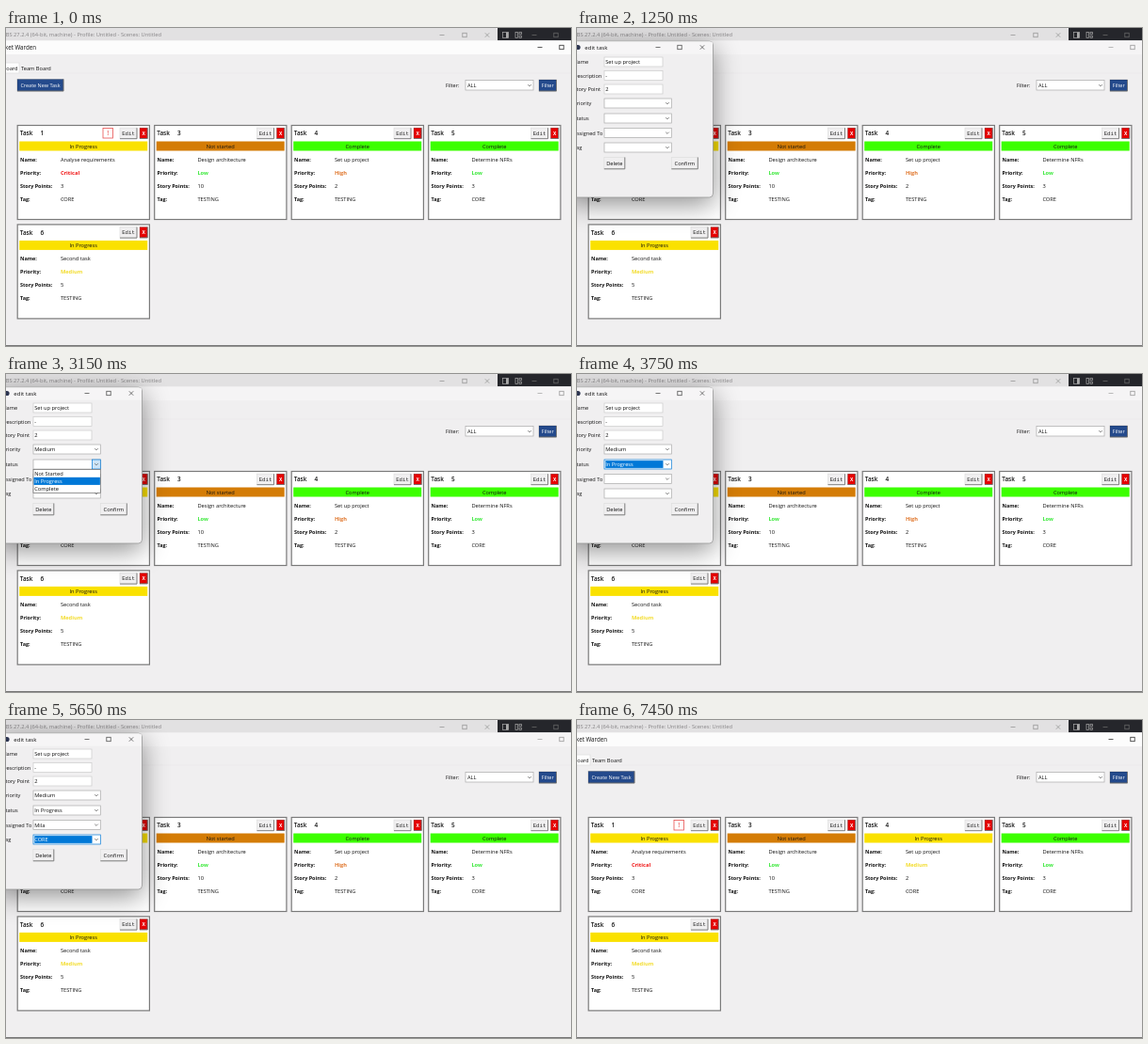
These frames come from a looping animation (600 px wide and 338 px high, 7.5 s). An HTML page with a canvas:

```html
<!DOCTYPE html>
<html lang="en">
<head>
<meta charset="utf-8">
<title>Task board</title>
<style>
html, body { margin: 0; height: 100%; overflow: hidden; background: #f0eff0; }
canvas { display: block; width: 600px; height: 338px; }
</style>
</head>
<body>
<canvas id="stage" width="600" height="338"></canvas>
<script>
const ctx = document.getElementById('stage').getContext('2d');
const LOOP = 7500, OPEN = 500, CLOSE = 6800;
const SANS = '"Open Sans", "Noto Sans", sans-serif';
const MONO = '"Liberation Mono", monospace';
const FACE = '#f0eff0', BLUE = '#0078d7', NAVY = '#244a8c';
const STATUS = { 'In Progress': '#fae100', 'Not started': '#d47c06', 'Complete': '#3cff00' };
const PRIORITY = { Critical: '#f01414', High: '#e0752a', Medium: '#f3dc2c', Low: '#35e835' };

// Each drop-down: centre line, choices, chosen index, opening and choosing time
const combos = [
  { label: 'Priority', y: 80, items: ['Low', 'Medium', 'High', 'Critical'], pick: 1, open: 1700, done: 2250 },
  { label: 'Status', y: 96, items: ['Not Started', 'In Progress', 'Complete'], pick: 1, open: 2700, done: 3300 },
  { label: 'Assigned To', y: 111.5, items: ['Person', 'Mila'], pick: 1, open: 4050, done: 4500 },
  { label: 'Tag', y: 127, items: ['CORE', 'TESTING'], pick: 0, open: 4900, done: 5400 }
];

function box(x, y, w, h, fill, stroke, line = 0.7) {
  if (fill) { ctx.fillStyle = fill; ctx.fillRect(x, y, w, h); }
  if (stroke) { ctx.strokeStyle = stroke; ctx.lineWidth = line; ctx.strokeRect(x, y, w, h); }
}

// y is the middle of the capitals
function text(s, x, y, { size = 5.7, color = '#111', weight = 400, align = 'left', font = SANS } = {}) {
  ctx.font = `${weight} ${size}px ${font}`;
  ctx.textAlign = align;
  ctx.fillStyle = color;
  ctx.fillText(s, x, y + size * 0.36);
}

function path(color, width, ...points) {
  ctx.strokeStyle = color;
  ctx.lineWidth = width;
  ctx.beginPath();
  points.forEach(([x, y]) => ctx.lineTo(x, y));
  ctx.stroke();
}

const dash = (x, y, c) => path(c, 0.8, [x - 2.5, y], [x + 2.5, y]);
const square = (x, y, c) => box(x - 2.2, y - 2.2, 4.4, 4.4, null, c, 0.8);
const chevron = (x, y) => path('#555', 0.7, [x - 1.8, y - 0.9], [x, y + 0.9], [x + 1.8, y - 0.9]);
function cross(x, y, c) {
  path(c, 0.8, [x - 2.2, y - 2.2], [x + 2.2, y + 2.2]);
  path(c, 0.8, [x - 2.2, y + 2.2], [x + 2.2, y - 2.2]);
}

function button(label, x, y, w, h, fill = FACE, color = '#111', style = {}) {
  box(x, y, w, h, fill, fill === FACE ? '#dedede' : 'rgba(0,0,0,0.3)');
  path('#757575', 0.9, [x, y + h], [x + w, y + h], [x + w, y]);
  text(label, x + w / 2, y + h / 2, { color, align: 'center', ...style });
}

function topBars(focused) {
  box(522, 0, 78, 13.3, '#25262b');
  box(527.5, 4.5, 6, 6, null, '#aaa');
  box(531, 4.5, 2.5, 6, '#aaa');
  box(541, 4.5, 2.5, 6, null, '#aaa');
  box(545, 4.5, 2.5, 2.2, null, '#aaa');
  box(545, 8.3, 2.5, 2.2, null, '#aaa');
  dash(561, 7.5, '#666');
  square(584, 7.5, '#666');

  ctx.fillStyle = '#e2e1e2';
  ctx.beginPath();
  ctx.roundRect(-5, 0, 527, 14, [0, 3, 0, 0]);
  ctx.fill();
  text('OBS 27.2.4 (64-bit, machine) - Profile: Untitled - Scenes: Untitled', 165, 7,
    { size: 5.75, color: '#858385', align: 'right' });
  dash(463, 7.5, '#999');
  square(487, 7.5, '#999');
  cross(511, 7.5, '#999');

  box(0, 13.3, 600, 14.7, focused ? '#fcfcfc' : '#f5f4f5');
  text('Ticket Warden', 32, 20.5, { size: 6.2, align: 'right' });
  dash(567, 20.5, focused ? '#333' : '#aaa');
  square(590, 20.5, focused ? '#333' : '#999');
}

function toolbar() {
  box(-1, 37, 15, 11, '#fff', '#ddd');
  text('Board', 12.5, 43, { align: 'right' });
  text('Team Board', 16, 43);
  path('#e6e5e6', 0.6, [14, 48], [600, 48]);
  button('Create New Task', 12, 54.5, 49, 12.5, NAVY, '#fff', { size: 5.5 });
  text('Filter:', 467, 61, { size: 5.5 });
  box(488, 55.5, 72, 10.5, '#fff', '#aaa');
  text('ALL', 490, 61);
  chevron(556, 61);
  button('Filter', 566, 55, 18.5, 12, NAVY, '#fff', { size: 5.5 });
}

function card(col, row, id, status, name, priority, points, tag) {
  const x = 12.2 + col * 145.5, y = 103.5 + row * 105.4;
  box(x, y, 140.2, 100, '#fff', '#7a7a7a', 1.2);
  text('Task', x + 2.6, y + 8.5, { size: 6.4, weight: 600 });
  text(id, x + 24.3, y + 8.5, { size: 6.4, weight: 600 });
  if (id === 1) {
    box(x + 90.8, y + 3, 10.5, 10.5, '#fff', '#e85050', 0.8);
    text('!', x + 96, y + 8.2, { size: 7, color: '#e02020', align: 'center' });
  }
  button('Edit', x + 108.8, y + 2.7, 18, 11.5, FACE, '#222', { size: 5.7, font: MONO });
  button('X', x + 129.8, y + 2.7, 8.2, 11.3, '#e60000', '#fff', { size: 5.6, weight: 700, font: MONO });
  box(x + 2, y + 17, 136, 10, STATUS[status]);
  text(status, x + 70, y + 22, { align: 'center' });
  const rows = [['Name:', name], ['Priority:', priority], ['Story Points:', points], ['Tag:', tag]];
  rows.forEach(([label, value], i) => {
    const ry = y + 36.3 + i * 14;
    text(label, x + 2.8, ry, { size: 5.45, weight: 700 });
    text(value, x + 45.7, ry, i === 1 ? { weight: 700, color: PRIORITY[value] } : {});
  });
}

function combo({ label, y, items, pick, open, done }, t, next) {
  const isOpen = t >= open && t < done, focused = t >= done && t < next;
  text(label, -3.6, y, { size: 5.6 });
  box(29, y - 5, 71.3, 10, '#fff', focused ? BLUE : '#aaa');
  if (isOpen) box(91.5, y - 5, 8.8, 10, '#cce4f7', BLUE);
  if (focused) box(30.3, y - 3.9, 61.2, 7.8, BLUE);
  if (t >= done) text(items[pick], 30.2, y, { color: focused ? '#fff' : '#111' });
  chevron(96, y);
}

function dropList({ y, items, pick, open, done }, t) {
  if (t < open || t >= done) return;
  const top = y + 5.4, pitch = 8.1;
  const progress = (t - open) / (done - open);
  const hover = Math.min(pick, Math.floor(progress * 2 * (pick + 1)) - 1);
  box(29, top, 71.3, items.length * pitch + 0.6, '#fff', '#666');
  items.forEach((item, i) => {
    const iy = top + 0.3 + i * pitch;
    if (i === hover) box(29.5, iy, 70.4, pitch, BLUE);
    text(item, 30.2, iy + pitch / 2, { color: i === hover ? '#fff' : '#111' });
  });
}

function dialog(t) {
  ctx.save();
  ctx.shadowColor = 'rgba(0,0,0,0.45)';
  ctx.shadowBlur = 28;
  ctx.shadowOffsetY = 7;
  ctx.fillStyle = FACE;
  ctx.beginPath();
  ctx.roundRect(-12, 14, 156.5, 166, 4);
  ctx.fill();
  ctx.restore();
  ctx.strokeStyle = '#999';
  ctx.lineWidth = 0.8;
  ctx.stroke();

  ctx.save();
  ctx.clip();
  box(-12, 14.4, 156, 13.4, '#f6f5f6');
  ctx.restore();
  ctx.fillStyle = '#2c3550';
  ctx.beginPath();
  ctx.arc(1, 20.5, 2.6, 0, Math.PI * 2);
  ctx.fill();
  text('edit task', 8.3, 20.7, { size: 6.1 });
  dash(86, 20.5, '#555');
  square(109, 20.5, '#555');
  cross(133, 20.5, '#555');

  [['Name', 'Set up project'], ['Description', '-'], ['Story Point', '2']].forEach(([label, value], i) => {
    const y = 36 + i * 14.5;
    text(label, -3.6, y, { size: 5.6 });
    box(29, y - 5, 62, 10, '#fff', '#ccc');
    text(value, 30.2, y);
  });
  combos.forEach((c, i) => combo(c, t, combos[i + 1]?.open ?? CLOSE));
  button('Delete', 28.8, 137.5, 22, 12.3);
  button('Confirm', 100.3, 137.5, 28, 12.3);
  combos.forEach(c => dropList(c, t));
}

function draw(now) {
  const t = now % LOOP;
  const editing = t >= OPEN && t < CLOSE;
  const edited = t >= CLOSE;
  box(0, 0, 600, 338, FACE);
  topBars(!editing);
  toolbar();
  card(0, 0, 1, 'In Progress', 'Analyse requirements', 'Critical', 3, 'CORE');
  card(1, 0, 3, 'Not started', 'Design architecture', 'Low', 10, 'TESTING');
  if (edited) card(2, 0, 4, 'In Progress', 'Set up project', 'Medium', 2, 'CORE');
  else card(2, 0, 4, 'Complete', 'Set up project', 'High', 2, 'TESTING');
  card(3, 0, 5, 'Complete', 'Determine NFRs', 'Low', 3, 'CORE');
  card(0, 1, 6, 'In Progress', 'Second task', 'Medium', 5, 'TESTING');
  box(0, 337, 600, 1, '#777');
  if (editing) dialog(t);
}

const start = performance.now();
(function tick() {
  draw(performance.now() - start);
  requestAnimationFrame(tick);
})();
</script>
</body>
</html>
```
